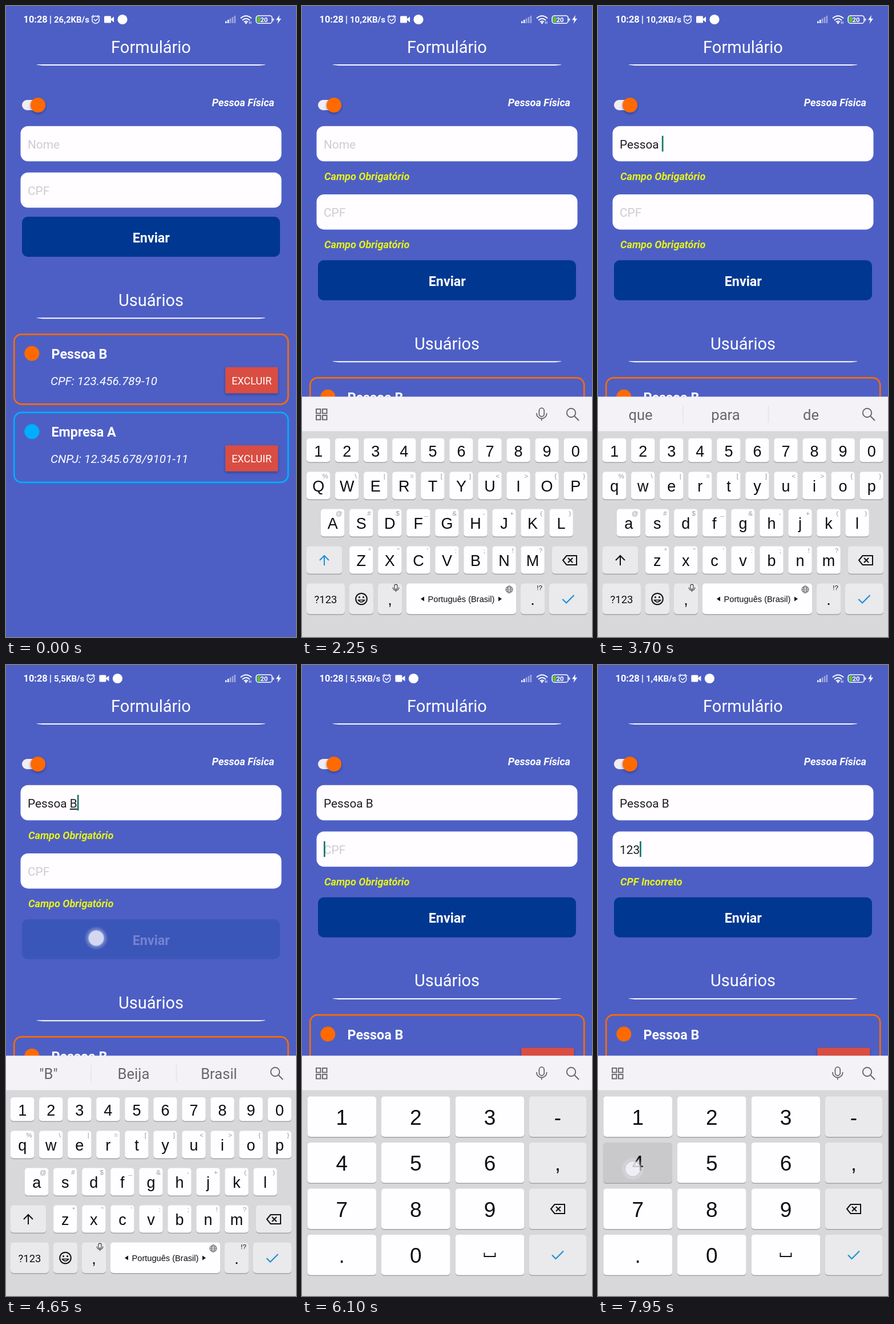
An HTML page that plays this animation: 508x1102 px, repeating every 8000 ms.

```html
<!DOCTYPE html>
<html lang="pt-BR">
<head>
<meta charset="utf-8">
<style>
html, body { margin: 0; width: 100%; height: 100%; overflow: hidden; background: #4d5fc5; }
svg { display: block; width: 100%; height: 100%; font-family: Roboto, sans-serif; }
text { white-space: pre; }
.key { font-family: "Liberation Sans", Arial, sans-serif; fill: #0c0c0e; }
.mid { text-anchor: middle; }
.err { font-weight: 700; font-style: italic; fill: #e6f21a; }
.ico { fill: none; stroke: #111; stroke-width: 2; }
</style>
</head>
<body>
<svg id="stage" viewBox="0 0 508 1102"></svg>
<script>
const LOOP = 8000;
const BLUE = '#1c8fd6';

// down, up, x, y, what is pressed
const taps = [
  [250, 380, 158, 405, 'send'],
  [1600, 1680, 150, 243, 'name'],
  [2400, 2470, 481, 850, 'P'],
  [2520, 2590, 131, 851, 'e'],
  [2630, 2690, 106, 904, 's'],
  [2740, 2800, 106, 904, 's'],
  [2840, 2900, 433, 857, 'o'],
  [2940, 3050, 66, 902, 'a'],
  [3390, 3470, 280, 1040, ' '],
  [3800, 3880, 42, 972, 'shift'],
  [4200, 4290, 256, 974, 'B'],
  [4520, 4680, 158, 477, 'send'],
  [5600, 5680, 200, 323, 'cpf'],
  [6250, 6340, 66, 796, '1'],
  [6500, 6590, 196, 798, '2'],
  [6740, 6830, 322, 798, '3'],
  [7120, 7270, 158, 443, 'send'],
  [7920, 8000, 61, 880, '4']
].map(([down, up, x, y, key]) => ({ down, up, x, y, key }));

const FOCUS_NAME = 1690, FOCUS_CPF = 5700, SWAP = 5750;
const speeds = [[0, '26,2'], [1350, '10,2'], [4250, '5,5'], [7050, '1,4']];
const hints = {
  '': null,
  'P': ['"P"', 'Para', 'Por'],
  'Pe': ['"Pe"', 'Pela', 'Pelo'],
  'Pes': ['"Pes"', 'Pessoa', 'Peso'],
  'Pess': ['"Pess"', 'Pessoal', 'Pessoa'],
  'Pesso': ['"Pesso"', 'Pessoas', 'Pessoa'],
  'Pessoa': ['Pessoas', 'Pessoa', 'Pessoal'],
  'Pessoa ': ['que', 'para', 'de'],
  'Pessoa B': ['"B"', 'Beija', 'Brasil']
};

const text = (x, y, size, str, attrs = '') =>
  `<text x="${x}" y="${y}" font-size="${size}" ${attrs}>${str.replace(/&/g, '&amp;').replace(/</g, '&lt;')}</text>`;
const rect = (x, y, w, h, r, fill, attrs = '') =>
  `<rect x="${x}" y="${y}" width="${w}" height="${h}" rx="${r}" fill="${fill}" ${attrs}/>`;
const path = (d, attrs) => `<path d="${d}" ${attrs}/>`;
const white = 'fill="#fff"';

const title = (str, y) => text(254, y, 29, str, 'class="mid" ' + white) +
  path(`M53 ${y + 20.6}H455Q450 ${y + 22.6} 438 ${y + 22.6}H70Q58 ${y + 22.6} 53 ${y + 20.6}Z`, white);

const field = (id, y) => rect(25.5, y, 457, 61.5, 13, '#fffdff') +
  `<text id="${id}" x="38" y="${y + 39}" font-size="20.8"></text>` +
  rect(38, y + 17, 2.7, 27.5, 0, '#15786f', `id="${id}Caret"`);

const card = (y, color, name, doc) =>
  rect(14.2, y, 480, 122, 13, 'none', `stroke="${color}" stroke-width="2.7"`) +
  `<circle cx="45.3" cy="${y + 33.5}" r="13" fill="${color}"/>` +
  text(79.5, y + 42.5, 23.3, name, 'font-weight="700" ' + white) +
  text(78, y + 88.5, 20.7, doc, 'font-style="italic" ' + white) +
  rect(384.3, y + 57.5, 92, 45.5, 2, '#da4d43', 'filter="url(#drop)"') +
  text(430.3, y + 87.3, 18.1, 'EXCLUIR', 'class="mid" ' + white);

function statusBar() {
  let s = text(30.5, 29, 16.4, '10:28', 'font-weight="700" ' + white) +
    rect(77.2, 17, 1.5, 14, 0, '#fff') +
    `<text id="speed" x="84" y="29" font-size="15" font-weight="600" fill="#fff"></text>`;
  s += '<g id="icons"><g fill="none" stroke="#fff" stroke-width="1.5">' +
    '<circle cx="157" cy="24" r="6.4"/><path d="M149.5 19.5l4-3.4M164.5 19.5l-4-3.4M154 23l2.6 3 4-3.6"/></g>' +
    rect(172, 17.5, 12, 12, 1.5, '#fff') + path('M183 23.5l6-5v10z', white) +
    '<circle cx="204" cy="23.5" r="8.6" fill="#fff"/></g>';
  for (let i = 0; i < 5; i++)
    s += rect(384 + i * 3.9, 26.5 - i * 2.4, 2.6, 3.5 + i * 2.4, 0.6, '#fff', `opacity="${i < 2 ? 0.95 : 0.45}"`);
  s += '<g fill="none" stroke="#fff" stroke-width="2"><path d="M411 21.5Q420.5 13 430 21.5M414 25Q420.5 19 427 25M417 28Q420.5 25 424 28"/></g>' +
    '<circle cx="420.5" cy="29.5" r="1.7" fill="#fff"/>' +
    path('M426.5 27v4M429 27v4', 'stroke="#fff" stroke-width="1"') +
    rect(438.2, 17, 28, 13.2, 4, 'none', 'stroke="#fff" stroke-width="1.6"') +
    rect(440, 18.8, 5.5, 9.6, 2, '#5cc520') + rect(467.5, 21.5, 1.8, 4.5, 0.8, '#fff') +
    text(452, 28, 11.5, '20', 'class="mid" font-weight="600" ' + white) +
    path('M479 16l-6 8.5h4l-1.500 6.500 6.500-9h-4z', white);
  return s;
}

const cap = (x, y, w, h, fill, r = 5, id = '') =>
  rect(x, y + 1.4, w, h, r, '#a3a2a6') + rect(x, y, w, h, r, fill, id);
const PLAIN = '#fefdff', SPECIAL = '#eae9eb';
const backspace = (x, y) => path(`M${x - 12} ${y}l6.500-8h17.500v16h-17.500zM${x - 3} ${y - 4}l8 8M${x + 5} ${y - 4}l-8 8`, 'class="ico"');
const check = (x, y) => path(`M${x - 10} ${y}l6.500 6.500l13.500-13.500`, `fill="none" stroke="${BLUE}" stroke-width="2.2"`);
const mic = (x, y, k, color) => `<g transform="translate(${x} ${y}) scale(${k})" fill="none" stroke="${color}" stroke-width="1.8">` +
  '<rect x="-4.500" y="-11" width="9" height="15" rx="4.500"/><path d="M-9-2v1a9 8.500 0 0 0 18 0v-1M0 7.500v4"/></g>';

const keyPos = {};
function letterPad() {
  const rows = [
    ['1234567890', 755, 41.5, 28.7, ''],
    ['qwertyuiop', 813.5, 48, 28.7, '%\\|=[]<>{}'],
    ['asdfghjkl', 878.5, 48, 53.7, '@#$_&-+()'],
    ['zxcvbnm', 943.5, 48, 103.8, '*"\':;!?']
  ];
  let s = '';
  for (const [chars, y, h, x0, marks] of rows) {
    [...chars].forEach((c, i) => {
      const x = x0 + i * 50.05;
      keyPos[c] = { x, y: y + h / 2 };
      s += cap(x - 20.7, y, 41.4, h, PLAIN) +
        text(x, y + (marks ? 34 : 31.5), 27, c, `class="key mid${marks ? ' letter' : ''}"`);
      if (marks) s += text(x + 17, y + 11.5, 11.5, marks[i], 'class="key" style="fill:#98979d" text-anchor="end"');
    });
  }
  s += cap(8, 943.5, 62, 48, SPECIAL) +
    path('M39 977v-17M31 968l8-8 8 8', 'class="ico" id="shift"') +
    cap(438, 943.5, 62, 48, SPECIAL) + backspace(469, 968) +
    cap(8, 1008.5, 67, 53.5, SPECIAL) + text(41.500, 1043, 18.5, '?123', 'class="mid" fill="#111"') +
    cap(83, 1008.5, 42, 53.5, SPECIAL) +
    '<circle cx="104" cy="1035.500" r="9.800" class="ico"/><path d="M98.500 1037.500q5.500 7 11 0z" fill="none" stroke="#111" stroke-width="1.600"/>' +
    '<circle cx="100.500" cy="1032.500" r="1.500"/><circle cx="107.500" cy="1032.500" r="1.500"/>' +
    cap(133, 1008.5, 42, 53.5, SPECIAL) + text(154, 1046, 27, ',', 'class="key mid"') + mic(164.5, 1016.5, 0.58, '#333') +
    cap(183, 1008.5, 192, 53.5, PLAIN, 5, 'id="space"') +
    text(279, 1041, 14.6, 'Português (Brasil)', 'class="key mid"') +
    path('M208 1035.500l6-4v8zM350 1035.500l-6-4v8z', 'fill="#111"') +
    '<g fill="none" stroke="#555" stroke-width="1"><circle cx="363" cy="1019" r="6"/><ellipse cx="363" cy="1019" rx="2.800" ry="6"/><path d="M357 1019h12M358 1016h10M358 1022h10"/></g>' +
    cap(383, 1008.5, 42, 53.5, SPECIAL) + text(404, 1046, 27, '.', 'class="key mid"') +
    text(416, 1020, 11.5, '!?', 'class="key mid"') +
    cap(433, 1008.5, 67, 53.5, SPECIAL) + check(466.5, 1036);
  return s;
}

function numberPad() {
  const xs = [9.5, 139, 268.7, 398];
  let s = '';
  ['123-', '456,', '789<', '.0_>'].forEach((row, j) => [...row].forEach((c, i) => {
    const y = 753.5 + j * 80.5, w = i < 3 ? 120.5 : 100, cx = xs[i] + w / 2, cy = y + 35.5;
    s += cap(xs[i], y, w, 70.5, i < 3 ? PLAIN : SPECIAL, 5, `id="num${c}"`);
    if (c === '<') s += backspace(cx, cy);
    else if (c === '>') s += check(cx, cy);
    else if (c === '_') s += path(`M${cx - 9.500} ${cy - 4}v6.500h19v-6.500`, 'class="ico"');
    else s += text(cx, cy + 13.5, 37, c, 'class="key mid"');
  }));
  return s;
}

const search = '<g fill="none" stroke="#66656a" stroke-width="1.900"><circle cx="471.500" cy="710.500" r="7.700"/><path d="M477 716l8 8"/></g>';
let tools = mic(419.8, 713, 0.98, '#66656a');
for (const x of [25, 36]) for (const y of [704, 715])
  tools += rect(x, y, 7.5, 7.5, 0, 'none', 'stroke="#66656a" stroke-width="1.900"');
const slots = [74.5, 223.5, 373].map((x, i) =>
  `<text id="hint${i}" x="${x}" y="722.500" font-size="25.600" class="mid" fill="#67666b"></text>`).join('') +
  path('M149 698v30M298.500 698v30', 'stroke="#e4e3e7" stroke-width="1.500"');

document.getElementById('stage').innerHTML = `
<defs>
  <filter id="drop" x="-20%" y="-30%" width="140%" height="170%">
    <feDropShadow dx="0" dy="2" stdDeviation="2" flood-color="#14205c" flood-opacity=".5"/>
  </filter>
  <radialGradient id="halo"><stop offset=".55" stop-color="#fff" stop-opacity=".4"/><stop offset="1" stop-color="#fff" stop-opacity="0"/></radialGradient>
</defs>
<rect width="508" height="1102" fill="#4d5fc5"/>
${statusBar()}
${title('Formulário', 81.5)}
${rect(28, 164, 40, 18, 9, '#f2edf2')}
<circle cx="56" cy="173" r="13" fill="#ff6a00" filter="url(#drop)"/>
${text(470, 175.3, 18.1, 'Pessoa Física', 'text-anchor="end" font-weight="700" font-style="italic" ' + white)}
${field('name', 209.7)}
${text(39, 304, 18.1, 'Campo Obrigatório', 'class="err" id="err1"')}
<g id="second">${field('cpf', 290.7)}${text(39, 385.300, 18.1, '', 'class="err" id="err2"')}</g>
<g id="rest">
  <g id="send">${rect(28, 368, 452, 70, 10, '#003791')}${text(254.3, 412.5, 23.3, 'Enviar', 'class="mid" font-weight="700" ' + white)}</g>
  ${title('Usuários', 523.7)}
  ${card(573.3, '#ff6a00', 'Pessoa B', 'CPF: 123.456.789-10')}
  ${card(709.8, '#00aeff', 'Empresa A', 'CNPJ: 12.345.678/9101-11')}
</g>
<g id="board">
  ${rect(0, 682.5, 508, 420, 0, '#d8d7d9')}${rect(0, 682.5, 508, 60, 0, '#f4f2f6')}
  ${search}<g id="tools">${tools}</g><g id="hints">${slots}</g>
  <g id="letters">${letterPad()}</g><g id="numbers">${numberPad()}</g>
</g>
<g id="popup"><circle r="37" fill="#fefdff" filter="url(#drop)"/><text id="popupChar" y="10" font-size="29" class="key mid"></text></g>
<g id="touches">${taps.map(p => `<g transform="translate(${p.x} ${p.y})"><circle r="21" fill="url(#halo)"/><circle r="13.500" fill="#f6f6fc" fill-opacity=".68" stroke="#a9b2dc" stroke-opacity=".5" stroke-width="1.500"/></g>`).join('')}</g>`;

const $ = id => document.getElementById(id);
const show = (el, on) => el.setAttribute('display', on ? 'inline' : 'none');
const move = (el, x, y) => el.setAttribute('transform', `translate(${x} ${y})`);
const clamp = (v, a = 0, b = 1) => Math.min(b, Math.max(a, v));
const letters = [...document.querySelectorAll('.letter')];
const touchEls = [...$('touches').children];
const typed = (t, re) => taps.filter(p => re.test(p.key) && t >= p.down + 40).map(p => p.key).join('');
const nameAt = t => typed(t, /^[a-z ]$/i);

function fill(id, value, hint, active, composing, blink) {
  const el = $(id), cut = composing ? value.lastIndexOf(' ') + 1 : value.length;
  el.innerHTML = value
    ? `<tspan>${value.slice(0, cut)}</tspan><tspan text-decoration="underline">${value.slice(cut)}</tspan>` : hint;
  el.setAttribute('fill', value ? '#1c1c20' : '#cdcbd1');
  const caret = $(id + 'Caret');
  show(caret, active && blink);
  caret.setAttribute('x', 38 + (value ? el.getComputedTextLength() : 0));
}

function update(t) {
  const speed = speeds.filter(s => t >= s[0]).pop()[1];
  $('speed').textContent = speed + 'KB/s';
  move($('icons'), speed.length < 4 ? -8.6 : 0, 0);

  const name = nameAt(t), cpf = typed(t, /^\d$/);
  const onName = t >= FOCUS_NAME && t < FOCUS_CPF, onCpf = t >= FOCUS_CPF;
  const marks = [FOCUS_NAME, FOCUS_CPF, ...taps.filter(p => p.key.length === 1).map(p => p.down + 40)];
  const blink = (t - Math.max(...marks.filter(m => m <= t))) % 1000 < 500;
  fill('name', name, 'Nome', onName, onName, blink);
  fill('cpf', cpf, 'CPF', onCpf, false, blink);

  const err1 = t >= 450 && t < 4760, err2 = t >= 450;
  show($('err1'), err1);
  $('err2').textContent = !err2 ? '' : t < 7350 ? 'Campo Obrigatório' : 'CPF Incorreto';
  move($('second'), 0, err1 ? 38.2 : 0);
  move($('rest'), 0, (err1 ? 38.2 : 0) + (err2 ? 37.8 : 0));

  let alpha = 1;
  for (const p of taps) if (p.key === 'send' && t >= p.down)
    alpha = Math.min(alpha, 1 - 0.78 * clamp((t - p.down) / 100) * (1 - clamp((t - p.up) / 250)));
  $('send').setAttribute('opacity', alpha);

  const rise = 1 - Math.pow(1 - clamp((t - 1800) / 280), 3);
  show($('board'), t > 1800);
  move($('board'), 0, 420 * (1 - rise));
  const digits = t >= SWAP, words = digits ? null : hints[nameAt(t - 60)];
  show($('letters'), !digits);
  show($('numbers'), digits);
  show($('tools'), !words);
  show($('hints'), !!words);
  if (words) words.forEach((w, i) => $('hint' + i).textContent = w);

  const caps = t < 2450 || (t >= 3840 && t < 4260);
  for (const el of letters) el.textContent = caps ? el.textContent.toUpperCase() : el.textContent.toLowerCase();
  $('shift').style.stroke = caps ? BLUE : '#111';

  const held = taps.find(p => t >= p.down && t < p.up + 30), key = held ? held.key : '';
  $('space').setAttribute('fill', key === ' ' ? '#c9c8cb' : PLAIN);
  for (const d of '1234') $('num' + d).setAttribute('fill', key === d ? '#c9c8cb' : PLAIN);
  const popped = /^[a-z]$/i.test(key);
  show($('popup'), popped);
  if (popped) {
    const at = keyPos[key.toLowerCase()];
    move($('popup'), clamp(at.x, 57, 451), at.y - 69);
    $('popupChar').textContent = key;
  }

  taps.forEach((p, i) => touchEls[i].setAttribute('opacity',
    t < p.down ? 0 : Math.min(clamp((t - p.down + 20) / 40), 1 - clamp((t - p.up) / 130))));
}

const start = performance.now();
function frame() {
  update((performance.now() - start) % LOOP);
  requestAnimationFrame(frame);
}
frame();
</script>
</body>
</html>
```
